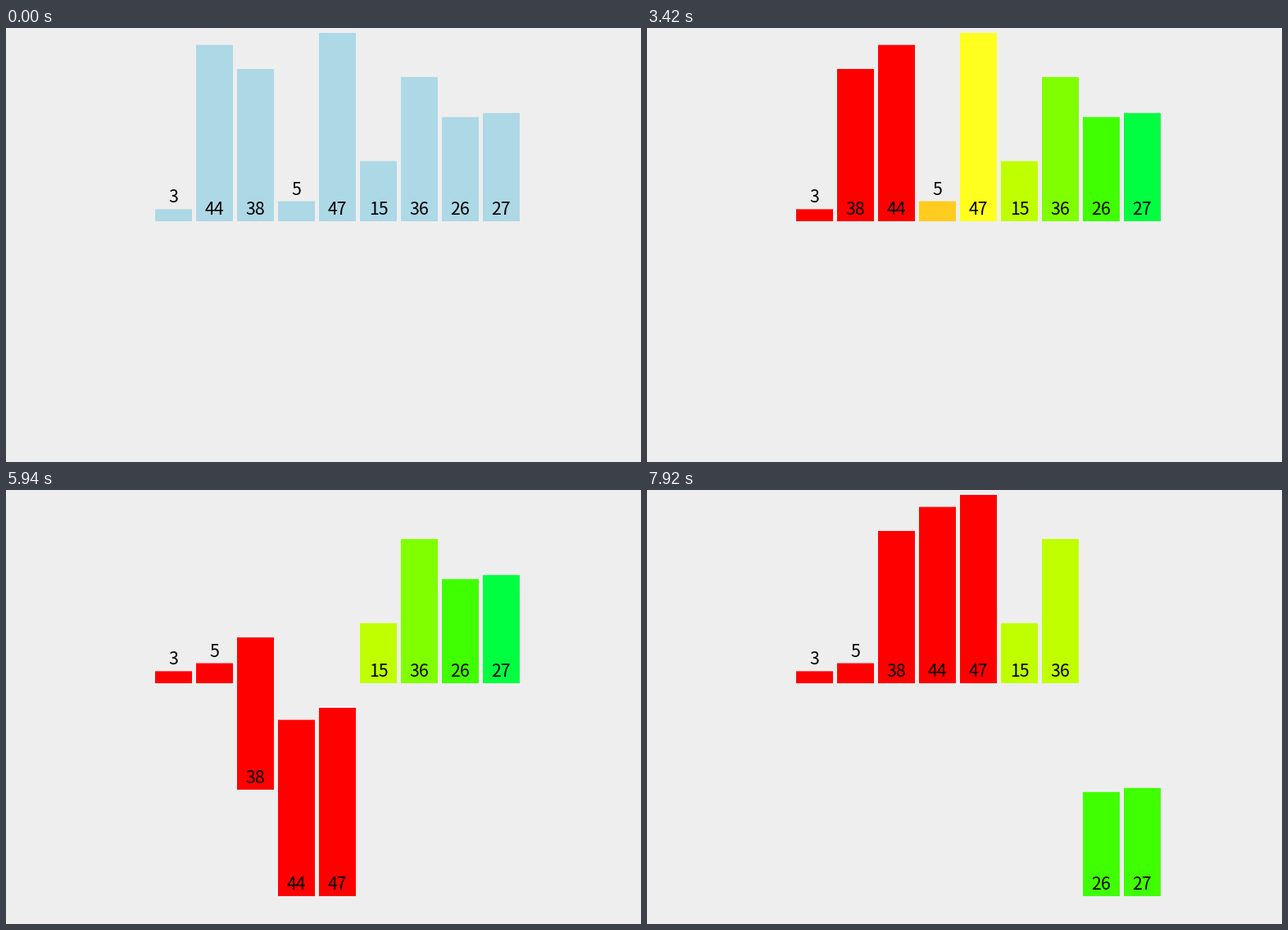
A matplotlib script for the animation above (8000 ms loop, 775 px wide and 530 px high).

```python
import colorsys

import numpy as np
import matplotlib.pyplot as plt
from matplotlib.animation import FuncAnimation
from matplotlib.patches import Rectangle

W, H, DPI = 775, 530, 100
LOOP, INTERVAL, TICK = 8000, 20, 30
MOVE = 100                      # duration of one transition in ms

VALUES = [3, 44, 38, 5, 47, 15, 36, 26, 27]
HUES = [0, 15, 30, 45, 60, 75, 90, 105, 135]
TINTS = {0: 0, 15: 35, 30: 35, 105: 105, 135: 135}
START_COLOR = np.array([173, 216, 230]) / 255

LEFT, PITCH, BAR_W = 182, 50, 45
BASE, DROP = 236, 260
UNIT = 230 / 47

# start time, time per step, first slot, end slot
MERGES = [
    (1136, 175, 0, 2),
    (2091, 178, 0, 3),
    (3400, 190, 3, 5),
    (4370, 190, 0, 5),
    (6496, 178, 5, 7),
    (7460, 180, 7, 9),
]


def vivid(hue):
    return np.array(colorsys.hsv_to_rgb(hue / 360, 1, 1))


def pale(hue):
    return np.array(colorsys.hsv_to_rgb(TINTS.get(hue, 60) / 360, 0.4, 1))


def build_events():
    """List of (time, bar, x, drop, color), in order of time."""
    order = list(range(len(VALUES)))
    hues = list(HUES)
    slot_x = [LEFT + PITCH * i for i in order]
    events = [(880, i, slot_x[i], 0, vivid(hues[i])) for i in order]

    for t, step, lo, hi in MERGES:
        group = order[lo:hi]
        for k, bar in enumerate(group):
            events.append((t, bar, slot_x[lo + k], 0, pale(hues[bar])))
        hue = hues[group[0]]
        group.sort(key=lambda bar: VALUES[bar])
        for drop in (DROP, 0):
            for k, bar in enumerate(group):
                t += step
                events.append((t, bar, slot_x[lo + k], drop, vivid(hue)))
        for bar in group:
            hues[bar] = hue
        order[lo:hi] = group
    return events


EVENTS = build_events()


def state_at(t):
    """One row per bar: x, drop, r, g, b."""
    rows = np.array([[LEFT + PITCH * i, 0, *START_COLOR]
                     for i in range(len(VALUES))])
    for start, bar, x, drop, color in EVENTS:
        if start >= t:
            continue
        p = min((t - start) / MOVE, 1)
        rows[bar] += (np.array([x, drop, *color]) - rows[bar]) * p
    return rows


fig = plt.figure(figsize=(W / DPI, H / DPI), dpi=DPI, facecolor="#eeeeee")
ax = fig.add_axes([0, 0, 1, 1])
ax.set_xlim(0, W)
ax.set_ylim(H, 0)
ax.axis("off")

bars, labels = [], []
for i, value in enumerate(VALUES):
    bar = Rectangle((0, 0), BAR_W, value * UNIT, linewidth=0,
                    snap=False, zorder=2 * i + 1)
    bars.append(ax.add_patch(bar))
    labels.append(ax.text(0, 0, str(value), ha="center", va="baseline",
                          family="Noto Sans CJK JP", fontsize=21.3 * 72 / DPI,
                          color="black", zorder=2 * i + 2))


def draw(frame):
    t = (frame * INTERVAL + 10) // TICK * TICK
    for value, bar, label, row in zip(VALUES, bars, labels, state_at(t)):
        x, bottom = row[0], BASE + row[1]
        height = value * UNIT
        bar.set_xy((x, bottom - height))
        bar.set_facecolor(np.clip(row[2:], 0, 1))
        foot = bottom if height > 30 else bottom - height
        label.set_position((x + BAR_W / 2, foot - 8))
    return bars + labels


anim = FuncAnimation(fig, draw, frames=LOOP // INTERVAL, interval=INTERVAL,
                     init_func=lambda: draw(0), repeat=True, repeat_delay=0)
plt.show()
```
